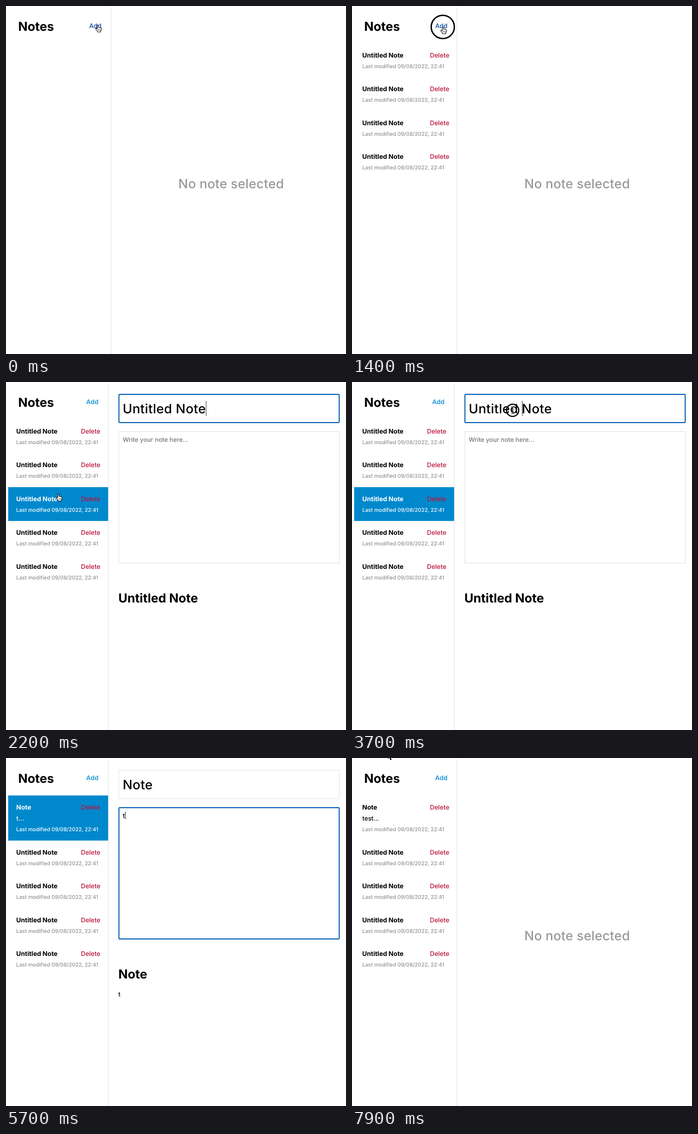
These frames come from a looping animation (740x756 px, 8000 ms). An HTML page with a canvas:

```html
<!DOCTYPE html>
<html lang="en">
<head>
<meta charset="utf-8">
<title>Notes</title>
<style>
  html, body { margin: 0; width: 100%; height: 100%; overflow: hidden; background: #fff; }
  canvas { display: block; }
</style>
</head>
<body>
<canvas id="stage" width="740" height="756"></canvas>
<script>
const ctx = document.getElementById('stage').getContext('2d');
const LOOP = 8000, STEP = 100;
const ROW = 73.5, ROW_TOP = 81.4, SNIPPET = 24.5;
const BLUE = '#0088cc', FOCUS = '#005cb4', LINE = '#dddddd', RED = '#b9143c';
const MODIFIED = 'Last modified 09/08/2022, 22:41';

const H1 = { font: '700 27px', spacing: 0 };
const INPUT = { font: '450 28px', spacing: 0.4 };
const EMPTY = { font: '450 28px', spacing: 0.2 };
const NAME = { font: '700 14px', spacing: 0 };
const LINK = { font: '450 13.9px', spacing: 0 };
const BODY = { font: '450 13.4px', spacing: 0 };
const SMALL = { font: '500 11.4px', spacing: 0 };

// Timeline
const OPEN = 2100, EDIT = 4400, BODY_CLICK = 5100, RELOAD = 7500;
const typing = [5700, 5900, 6100, 6300];
const addPresses = [600, 800, 1000, 1200, 1400];
const presses = [...addPresses, 2000].map(at => ({ at, hold: 100 }))
  .concat({ at: 3600, hold: 200 }, { at: BODY_CLICK, hold: 200 });
const caretResets = [OPEN, 3600, EDIT, BODY_CLICK, ...typing];

// Pointer hot spot: time, x, y
const pointerPath = [
  [0, 200, 41], [100, 200, 41], [300, 198, 45], [1600, 198, 45],
  [2000, 114, 243], [2300, 114, 243], [3500, 350, 61], [4600, 350, 61],
  [5100, 256, 171], [6500, 256, 171], [7200, 80, -22], [7500, 80, -22],
  [7900, 78, -12]
];

function useStyle(style) {
  ctx.font = `${style.font} Inter, sans-serif`;
  ctx.letterSpacing = `${style.spacing}px`;
  ctx.textRendering = 'geometricPrecision';
}

function text(str, x, y, style, color, align = 'left') {
  useStyle(style);
  ctx.fillStyle = color;
  ctx.textAlign = align;
  ctx.fillText(str, x, y);
}

function textWidth(str, style) {
  useStyle(style);
  return ctx.measureText(str).width;
}

function rect(x, y, w, h, color) {
  ctx.fillStyle = color;
  ctx.fillRect(x, y, w, h);
}

function field(x, y, w, h, focused) {
  const width = focused ? 2.2 : 1;
  const inset = focused ? 0.8 : 0.5;
  ctx.strokeStyle = focused ? FOCUS : LINE;
  ctx.lineWidth = width;
  ctx.beginPath();
  ctx.roundRect(x + inset, y + inset, w - 2 * inset, h - 2 * inset, focused ? 2 : 0);
  ctx.stroke();
}

function pointerAt(t) {
  const next = pointerPath.findIndex(p => p[0] > t);
  if (next < 0) return pointerPath.at(-1).slice(1);
  const [t0, x0, y0] = pointerPath[next - 1], [t1, x1, y1] = pointerPath[next];
  const k = (t - t0) / (t1 - t0), ease = k * k * (3 - 2 * k);
  return [x0 + (x1 - x0) * ease, y0 + (y1 - y0) * ease];
}

const shapes = {
  arrow: new Path2D('M0 0V14L3.2 11L5.6 16.7L8.2 15.6L5.8 10.2H10.2Z'),
  hand: new Path2D('M-1.4 9V1.6Q-1.2 .4 0 .4Q1.2 .4 1.3 1.6V5.4Q2.6 4.5 3.6 5.8Q5 5.2 5.8 6.5' +
    'Q7.8 6 7.8 8.2L7.3 11.5L6.2 13.6V15.5H-.8V14L-4.6 9.3Q-5.4 7.7-4 7.3Q-3 7.2-1.4 9Z'),
  knuckles: new Path2D('M1 9.5V12.5M3 9.5V12.5M5 9.5V12.5'),
  beam: new Path2D('M-3 -8Q0 -8 0 -6V6Q0 8-3 8M3 -8Q0 -8 0 -6V6Q0 8 3 8M-1.5 3H1.5')
};

function outline(path, color, width) {
  ctx.strokeStyle = color;
  ctx.lineWidth = width;
  ctx.stroke(path);
}

function drawPointer(x, y, kind) {
  ctx.save();
  ctx.translate(x, y);
  ctx.lineJoin = 'round';
  if (kind === 'beam') {
    outline(shapes.beam, '#fff', 2.6);
    outline(shapes.beam, '#000', 1);
  } else if (kind === 'hand') {
    ctx.fillStyle = '#fff';
    ctx.fill(shapes.hand);
    outline(shapes.hand, '#000', 1.1);
    outline(shapes.knuckles, '#000', 0.8);
  } else {
    outline(shapes.arrow, '#fff', 2);
    ctx.fillStyle = '#000';
    ctx.fill(shapes.arrow);
  }
  ctx.restore();
}

function drawRing(t, x, y) {
  const press = presses.find(p => t >= p.at && t < p.at + p.hold);
  if (!press) return;
  const fresh = t - press.at < 100;
  ctx.strokeStyle = '#000';
  ctx.lineWidth = fresh ? 3 : 2.6;
  ctx.beginPath();
  ctx.arc(x - 0.4, y + 0.5, fresh ? 25.2 : 13.3, 0, Math.PI * 2);
  ctx.stroke();
}

function drawSidebar(state, hoverAdd) {
  const shift = state.open ? -6.5 : 0;
  rect(state.open ? 222 : 228, 4, 1, 752, LINE);
  text('Notes', 26.4, 53.5, H1, '#000');
  text('Add', 180.9 + shift, 48, LINK, hoverAdd ? '#0b4aa2' : BLUE);

  let top = ROW_TOP;
  for (let i = 0; i < state.count; i++) {
    const active = i === state.selected, edited = state.edited && i === 0;
    const snippet = edited ? state.body : '';
    const height = ROW + (snippet ? SNIPPET : 0);
    const ink = active ? '#fff' : '#000';
    if (active) rect(4.7, top, 217.5, height, BLUE);
    text(edited ? 'Note' : 'Untitled Note', 22.3, top + 30.5, NAME, ink);
    text('Delete', 169.4 + shift, top + 30.5, LINK, RED);
    if (snippet) text(snippet + '...', 22.6, top + 55, BODY, ink);
    text(MODIFIED, 22.2, top + height - 20, SMALL, active ? '#fff' : '#919191');
    top += height;
  }
}

function drawEditor(t, state) {
  const inBody = t >= BODY_CLICK;
  const title = state.edited ? 'Note' : 'Untitled Note';
  field(245, 26, 481, 63, !inBody);
  field(245, 107, 481, 287, inBody);
  text(title, 254, 68, INPUT, '#000');
  text(state.body || 'Write your note here...', 254, 129.5, BODY, state.body ? '#000' : '#757575');
  text(title, 244.4, 478.5, H1, '#000');
  text(state.body, 244.5, 518, BODY, '#000');

  const reset = caretResets.findLast(at => at <= t);
  if ((t - reset) % 1200 >= 600) return;
  if (inBody) {
    rect(Math.round(254 + textWidth(state.body, BODY)), 117, 1, 16, '#000');
  } else {
    const before = state.edited ? '' : t >= 3600 ? 'Untitled ' : title;
    rect(Math.round(254 + textWidth(before, INPUT)), 41, 1, 33, '#222');
  }
}

function render(t) {
  const open = t >= OPEN && t < RELOAD;
  const edited = t >= EDIT;
  const state = {
    open, edited,
    selected: open ? (edited ? 0 : 2) : -1,
    count: addPresses.filter(at => t >= at + 100).length,
    body: 'test'.slice(0, typing.filter(at => t >= at).length)
  };
  const [x, y] = pointerAt(t);
  const hoverAdd = x > 172 && x < 210 && y > 32 && y < 56;
  const overRow = x > 5 && x < 222 && y > ROW_TOP && y < ROW_TOP + ROW * state.count;
  const overField = open && x > 245 && ((y > 26 && y < 89) || (y > 107 && y < 394));
  const hidden = (t >= EDIT && t < 4700) || (t >= typing[0] && t < 6600);

  rect(0, 0, 740, 756, '#fff');
  drawSidebar(state, hoverAdd);
  if (open) drawEditor(t, state);
  else text('No note selected', 490, 396, EMPTY, '#999', 'center');
  if (!hidden) {
    drawPointer(x, y, overField ? 'beam' : hoverAdd || overRow ? 'hand' : 'arrow');
    drawRing(t, x, y);
  }
}

const start = performance.now();
function frame() {
  const t = (performance.now() - start) % LOOP;
  render(Math.floor(t / STEP) * STEP);
  requestAnimationFrame(frame);
}
frame();
</script>
</body>
</html>
```
